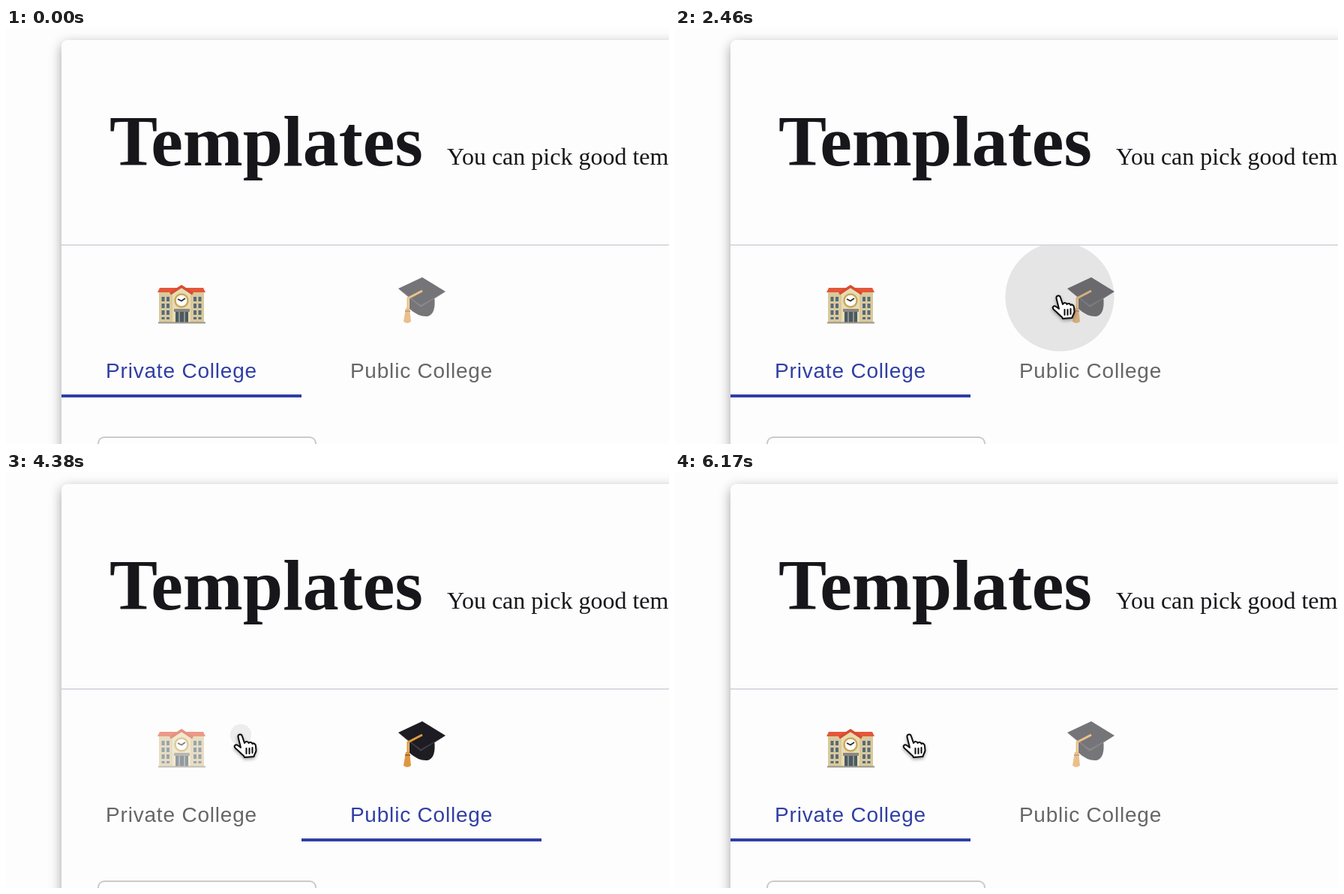
Write an HTML page that moves like this. It is 884 by 554 pixels and loops after 6.21 s.

```html
<!DOCTYPE html>
<html lang="en">
<head>
<meta charset="utf-8">
<title>Templates</title>
<style>
  html, body { margin: 0; width: 100%; height: 100%; overflow: hidden; background: #fdfdfd; }
  svg { display: block; }
  .card { fill: #fdfdfd; filter: drop-shadow(0 5px 8px rgba(0, 0, 0, .36)); }
  .serif { font-family: "Liberation Serif", Times, serif; fill: #17171b; }
  .label { font: 28px "Liberation Sans", Arial, sans-serif; letter-spacing: .8px; text-anchor: middle; }
  .ripple { mix-blend-mode: multiply; }
  #hand, #arrow { filter: drop-shadow(0 2px 2px rgba(0, 0, 0, .35)); }
</style>
</head>
<body>
<svg width="884" height="554" viewBox="0 0 884 554">
  <rect class="card" x="74" y="16" width="900" height="700" rx="8"/>
  <text class="serif" x="138" y="183" font-size="96" font-weight="bold">Templates</text>
  <text class="serif" x="588" y="182" font-size="32">You can pick good templates</text>
  <path d="M74 289H884" stroke="#dadae2" stroke-width="2"/>
  <rect x="123" y="545" width="290" height="60" rx="8" fill="none" stroke="#cbcbcb" stroke-width="2"/>

  <g class="icon">
    <path d="M204 351H264V392H204Z" fill="#d9c99a"/>
    <path d="M222 354L234 346L246 354V392H222Z" fill="#e8dcb4"/>
    <path d="M205 346H263L266 352H202Z" fill="#e4573a"/>
    <path d="M222 356V353L234 346L246 353V356Z" fill="#e8dcb4"/>
    <path d="M219 354L234 344L249 354" fill="none" stroke="#d84c30" stroke-width="3.5"/>
    <path d="M209.500 358V388M216 358V388M252 358V388M258.500 358V388" stroke="#566a7c" stroke-width="4" stroke-dasharray="6 3"/>
    <circle cx="234" cy="363" r="8.500" fill="#fff" stroke="#c9a95a" stroke-width="2.500"/>
    <path d="M239 360L234 363.500L229 361" fill="none" stroke="#2a2a2c" stroke-width="1.700"/>
    <path d="M224 374H245V378H224Z" fill="#8c8780"/>
    <path d="M226 378H243V392H226Z" fill="#4a5a62"/>
    <path d="M231 378V392M238 378V392" stroke="#a8a59c" stroke-width="1.500"/>
    <path d="M203 392.500H266" stroke="#9a968c" stroke-width="2"/>
  </g>
  <g class="icon">
    <path d="M538 357V374Q550 385 562 384Q574 381 571 357Z" fill="#1d1d22"/>
    <path d="M523 347L555 332L586 351L553 371Z" fill="#1c1c22"/>
    <path d="M523 347L553 369L586 351L553 372Z" fill="#3c3c42"/>
    <path d="M555 350L536 360V376" fill="none" stroke="#e09a3c" stroke-width="3"/>
    <path d="M533 373H538L540 391Q535 395 530 391Z" fill="#de9640"/>
    <path d="M532 377H539" stroke="#a8692a" stroke-width="2"/>
  </g>

  <svg x="74" y="290" width="320" height="202"><circle class="ripple"/></svg>
  <svg x="394" y="290" width="320" height="202"><circle class="ripple"/></svg>

  <text class="label" x="234" y="466">Private College</text>
  <text class="label" x="554" y="466">Public College</text>
  <rect id="bar" y="488" width="320" height="4" fill="#303fa4"/>

  <g id="hand" stroke="#0c0c0c" stroke-width="2" stroke-linecap="round" stroke-linejoin="round">
    <path fill="#fff" d="M-2.500 2C-3 -2 2 -3 3 1L6 10C8 7 11 8 11.500 10C13 8 16 9 16.500 11C18 9.500 21 11 21 14L21.500 20C21 23 19 25 18.500 28L6 29L5 27C1 24 -2 20 -6 17C-9 14 -6 11 -3 13L1 16Z"/>
    <path d="M8.500 17V24M12.500 17V24M16.500 16V23"/>
  </g>
  <path id="arrow" d="M0 0V26L6 20.500L10.500 30L15 28L10.500 19H19Z" fill="#0c0c0c" stroke="#fff" stroke-width="2"/>
</svg>
<script>
  const LOOP = 6210, RIPPLE = 550, SLIDE = 300;
  const $ = id => document.getElementById(id);
  const all = name => [...document.querySelectorAll(name)];
  const icons = all('.icon'), labels = all('.label'), ripples = all('.ripple');

  // Press and release times, with the ripple centre inside each tab
  const presses = [
    { x: 239, y: 60, down: 4307, up: 4745 },
    { x: 119, y: 68, down: 2310, up: 2856 }
  ];
  const stops = [[300, 700, 600], [1200, 511, 358], [3450, 511, 358], [4150, 312, 351]];

  const clamp = v => Math.min(1, Math.max(0, v));
  const mix = (a, b, k) => a + (b - a) * k;

  // cubic-bezier(.4, 0, .2, 1)
  function ease(v) {
    v = clamp(v);
    let lo = 0, hi = 1;
    for (let i = 0; i < 20; i++) {
      const s = (lo + hi) / 2, r = 1 - s;
      if (1.2 * s * r * r + .6 * s * s * r + s ** 3 < v) lo = s; else hi = s;
    }
    return lo * lo * (3 - 2 * lo);
  }

  function drawRipple(circle, { x, y, down, up }, t) {
    const grow = ease((t - down) / RIPPLE);
    const radius = Math.hypot(Math.max(x, 320 - x) + 1, Math.max(y, 202 - y) + 1);
    const opacity = t < down ? 0 : mix(1 / 3, 1, grow) * (1 - ease((t - up) / RIPPLE));
    circle.setAttribute('cx', x);
    circle.setAttribute('cy', y);
    circle.setAttribute('r', radius * grow);
    circle.setAttribute('fill', t < up ? '#d2d2d2' : '#bec3e7');
    circle.style.opacity = opacity;
  }

  function pointer(t) {
    let [, x, y] = stops[0];
    for (let i = 1; i < stops.length; i++) {
      const [t0] = stops[i - 1], [t1, x1, y1] = stops[i];
      const k = clamp((t - t0) / (t1 - t0)), s = k * k * (3 - 2 * k);
      x = mix(x, x1, s);
      y = mix(y, y1, s);
    }
    return [x, y];
  }

  function draw() {
    const t = performance.now() % LOOP;
    const [first, second] = presses;
    const active = t >= second.up && t < first.up ? 1 : 0;

    presses.forEach((press, i) => {
      icons[i].style.opacity = i === active ? 1 : .6;
      labels[i].setAttribute('fill', i === active ? '#303fa4' : '#666668');
      drawRipple(ripples[i], press, t);
    });

    const slide = ease((t - second.up) / SLIDE) - ease((t - first.up) / SLIDE);
    $('bar').setAttribute('x', 74 + 320 * slide);

    const [x, y] = pointer(t);
    const overTab = x > 74 && x < 714 && y > 290 && y < 492;
    for (const [id, shown] of [['hand', overTab], ['arrow', !overTab]]) {
      $(id).setAttribute('transform', `translate(${x} ${y})`);
      $(id).style.display = shown ? '' : 'none';
    }
    requestAnimationFrame(draw);
  }
  draw();
</script>
</body>
</html>
```
